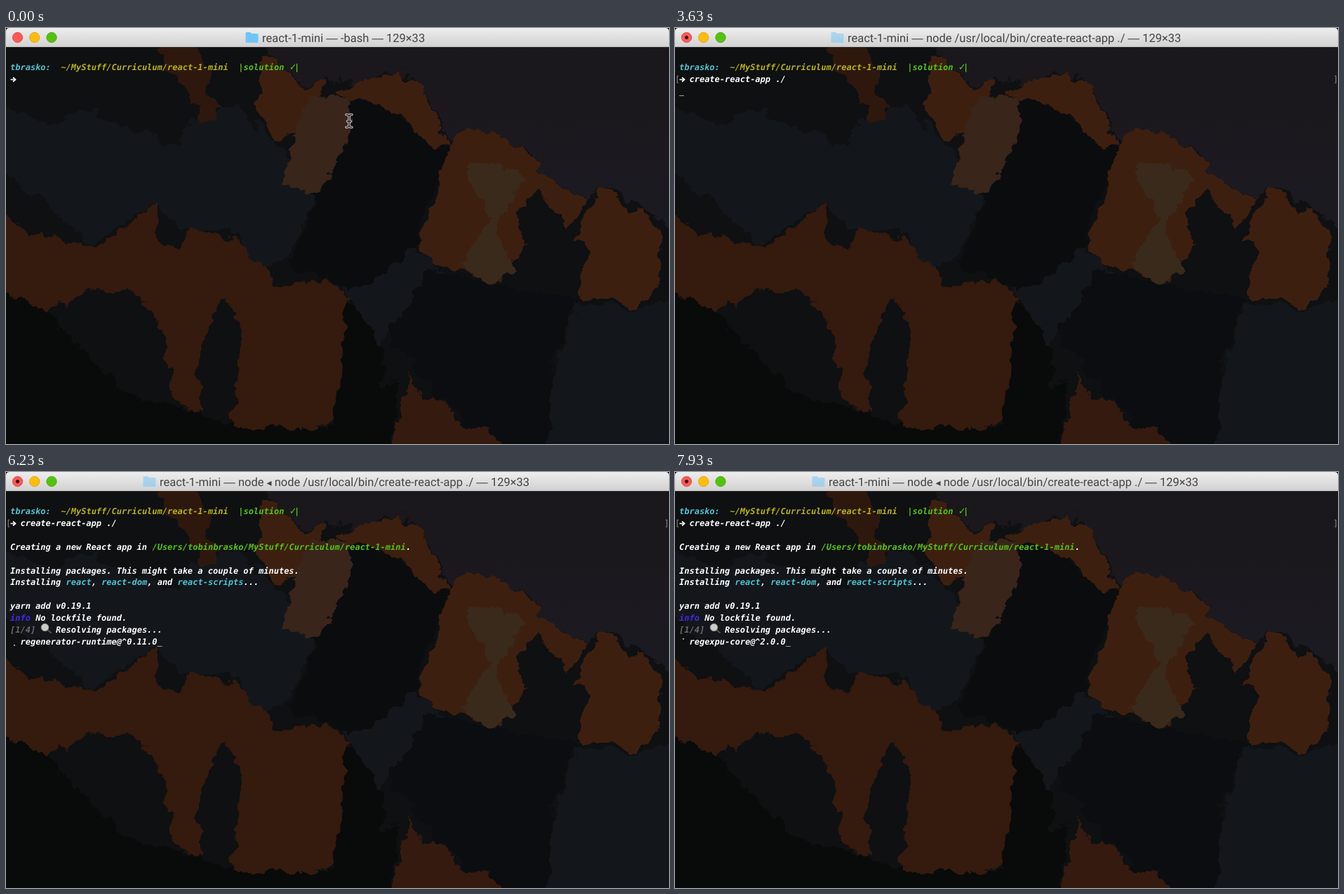
An HTML page for the animation above (8000 ms loop, 945 px wide and 593 px high).

```html
<!DOCTYPE html>
<html lang="en">
<head>
<meta charset="utf-8">
<title>Terminal</title>
<style>
  html, body { margin: 0; width: 100%; height: 100%; overflow: hidden; background: #0f1114; }
  svg { display: block; width: 945px; height: 593px; }
  text { white-space: pre; text-rendering: geometricPrecision; }
  #screen text { font: italic bold 12.01px "DejaVu Sans Mono", "Liberation Mono", monospace; fill: #fff; }
  #titles text { font: 16.5px Roboto, Inter, sans-serif; fill: #444; }
  #titles .dash { font-family: "Liberation Sans", sans-serif; }
  #titles .arrow { font-size: 14px; }
  #screen .cyan { fill: #4fc3d1; }
  #screen .yellow { fill: #b9b312; }
  #screen .green { fill: #55c410; }
  #screen .blue { fill: #4527e6; }
  #screen .gray { fill: #6b6b6b; }
  #screen .check { font: bold 13px "DejaVu Sans", sans-serif; }
  #screen .bracket { font-style: normal; font-weight: normal; fill: #8a8a8a; }
</style>
</head>
<body>
<svg viewBox="0 0 945 593">
  <defs>
    <linearGradient id="bar" x2="0" y2="1">
      <stop stop-color="#efeeef"/><stop offset="1" stop-color="#d2d1d2"/>
    </linearGradient>
    <linearGradient id="sky" x2="0" y2="1">
      <stop stop-color="#19171a"/><stop offset=".4" stop-color="#1c1a21"/>
    </linearGradient>
    <filter id="rocky" x="0" y="0" width="945" height="593" filterUnits="userSpaceOnUse" color-interpolation-filters="sRGB">
      <feTurbulence type="fractalNoise" baseFrequency=".05" numOctaves="4" seed="4"/>
      <feColorMatrix values="1 0 0 0 0  0 1 0 0 0  0 0 1 0 0  0 0 0 0 1" result="noise"/>
      <feDisplacementMap in="SourceGraphic" in2="noise" scale="24" xChannelSelector="R" yChannelSelector="G"/>
    </filter>
    <path id="folder" d="M1 7.5q0-1.5 1.5-1.5h5l2 2h8q1.5 0 1.5 1.5v10q0 1.5-1.5 1.5h-15q-1.5 0-1.5-1.5z" fill="#6fc5f7"/>
    <path id="beam" d="M485 123.5q4 0 4 3v12q0 3-4 3M493 123.5q-4 0-4 3v12q0 3 4 3M486.5 133h5"/>
  </defs>

  <rect width="945" height="593" fill="url(#sky)"/>
  <g filter="url(#rocky)">
    <path fill="#0e1012" d="M-30 0H365L378 42 420 82 455 75 500 80 535 62 575 65 600 95 635 165 680 145 750 175 762 205 832 245 850 222 920 265 980 310V630H-30z"/>
    <g fill="#13171b">
      <path d="M-30 100 60 140 110 115 240 170 265 130 330 110 400 180 440 240 395 335 360 340 320 290 250 290 215 250 120 310 60 250-30 190z"/>
      <path d="M480 370 560 300 600 330 650 370 560 430 530 450z"/>
      <path d="M815 390 900 402 980 370V630H760L785 470z"/>
    </g>
    <path fill="#0b0c0e" d="M490 105 540 110 610 170 635 172 600 250 580 310 520 370 480 370 455 355 405 340 440 240z"/>
    <path fill="#0c0d10" d="M600 345 700 367 815 388 780 470 770 620H700L650 560 580 480 545 440z"/>
    <g fill="#3d1f10">
      <path fill="#2e180d" d="M205 10H262L285 60 302 130 280 137 262 95 235 60z"/>
      <path d="M365 45 378 42 420 85 455 75 450 110 410 150 385 160 358 130z"/>
      <path d="M470 95 515 70 560 62 590 80 632 165 610 180 570 130 520 108z"/>
      <path fill="#39251a" d="M430 95 490 100 488 150 450 235 392 225 415 140z"/>
      <path d="M640 150 685 143 750 178 762 205 830 245 800 290 760 230 725 265 740 310 700 365 605 335 583 310 610 250 625 185z"/>
      <path fill="#3a2a1b" d="M650 200 700 190 740 215 700 280 725 345 690 367 645 340 690 270z"/>
      <path d="M850 222 885 258 910 262 935 300 930 370 900 400 815 380 830 310 808 300z"/>
      <path fill="#351a0e" d="M-30 245 40 295 130 312 170 285 215 250 212 300 245 312 265 287 320 300 375 345 385 370 455 357 490 385 485 470 470 565 400 578 320 570 335 420 310 380 270 470 280 550 235 530 232 440 180 372 130 372 60 405-30 365z"/>
    </g>
    <path fill="#090a0a" d="M-30 365 60 405 90 440 170 520 250 540 330 570 470 570 487 385 540 460 535 510 560 500 548 630H-30z"/>
    <path fill="#351b0f" d="M545 630 575 492 590 530 615 520 640 560 690 575 720 630z"/>
  </g>

  <rect width="945" height="27" fill="url(#bar)"/>
  <path d="M0 0H5Q0 0 0 5zM945 0H940Q945 0 945 5z" fill="#111"/>
  <path d="M0 27.5H945" stroke="#45423f" stroke-opacity=".6"/>
  <g stroke-width=".8">
    <circle cx="16.5" cy="13.5" r="7.2" fill="#fb5a55" stroke="#df4340"/>
    <circle cx="40.7" cy="13.5" r="7.2" fill="#fdbc08" stroke="#dfa012"/>
    <circle cx="65" cy="13.5" r="7.2" fill="#53c20d" stroke="#43a50c"/>
  </g>
  <circle cx="16.5" cy="13.5" r="2.5" fill="#3d0502" data-from="3630"/>
  <g id="titles"></g>

  <g id="screen">
    <path d="M6.5 73.5h5M10 70.5l3.5 3-3.5 3" fill="none" stroke="#fff" stroke-width="1.7"/>
    <g data-from="3530">
      <text class="bracket" x="0" y="77">[</text>
      <text class="bracket" x="938" y="77">]</text>
    </g>
    <text id="command"></text>
    <text id="package"></text>
    <circle id="spinner" r=".9" fill="#ddd"/>
    <rect id="cursor" width="7" height="1" fill="#a0a0a0"/>
    <g data-from="5460">
      <path d="M59 225l5 4" stroke="#55504c" stroke-width="2.2" stroke-linecap="round"/>
      <circle cx="55.5" cy="221.5" r="5.3" fill="#c9cbc9" stroke="#8c8c8a"/>
    </g>
  </g>

  <g data-until="200" fill="none" stroke-linecap="round">
    <use href="#beam" stroke="#c4c4c4" stroke-width="3.6"/>
    <use href="#beam" stroke="#222" stroke-width="1.3"/>
  </g>
</svg>

<script>
const LOOP = 8000;
const COMMAND = 'create-react-app ./';
const KEY_TIMES = [400, 760, 860, 1060, 1230, 1300, 1500, 1590, 1670, 1760,
  2000, 2160, 2260, 2400, 2515, 2630, 2960, 3230, 3260];

// [start time, folder x, folder opacity, text]
const TITLES = [
  [0, 341, 1, 'react-1-mini — -bash — 129×33'],
  [3630, 222, .5, 'react-1-mini — node /usr/local/bin/create-react-app ./ — 129×33'],
  [4260, 195, .5, 'react-1-mini — node ◂ node /usr/local/bin/create-react-app ./ — 129×33'],
];

// [start time, row, then column, text and colour class for each run]
const LINES = [
  [0, 0, [0, 'tbrasko:', 'cyan'], [10, '~/MyStuff/Curriculum/react-1-mini', 'yellow'],
    [45, '|solution', 'green'], [55, '✓', 'green check'], [56, '|', 'green']],
  [4200, 3, [0, 'Creating a new React app in '],
    [28, '/Users/tobinbrasko/MyStuff/Curriculum/react-1-mini', 'green'], [78, '.']],
  [4750, 5, [0, 'Installing packages. This might take a couple of minutes.']],
  [4800, 6, [0, 'Installing '], [11, 'react', 'cyan'], [16, ', '], [18, 'react-dom', 'cyan'],
    [27, ', and '], [33, 'react-scripts', 'cyan'], [46, '...']],
  [5200, 8, [0, 'yarn add v0.19.1']],
  [5260, 9, [0, 'info', 'blue'], [5, 'No lockfile found.']],
  [5460, 10, [0, '[1/4]', 'gray'], [9, 'Resolving packages...']],
];

// [start time, row]; row -1 hides the cursor
const CURSOR_ROWS = [[0, -1], [300, 1], [3530, 2], [4200, 5], [4700, -1],
  [4750, 6], [4800, 8], [5200, 9], [5260, 10], [5460, 11]];

const PACKAGES = `react react-dom react-scripts fbjs@^0.8.4 loose-envify@^1.1.0
  object-assign@^4.1.0 autoprefixer@6.7.2 babel-core@6.22.1 babel-jest@18.0.0
  babel-loader@6.2.10 css-loader@0.26.1 core-js@^2.4.0 regenerator-runtime@^0.11.0
  babel-runtime@^6.22.0 chalk@1.1.3 eslint@3.16.1
  babel-plugin-transform-es2015-classes@^6.22.0 babel-types@^6.22.0
  babel-traverse@^6.22.0 json5@^0.5.0 babylon@^6.11.0 debug@^2.1.1 lodash@^4.14.0
  minimatch@^3.0.2 slash@^1.0.0 source-map@^0.5.0 globals@^9.0.0 invariant@^2.2.0
  esutils@^2.0.2 babel-template@^6.22.0 babel-plugin-syntax-jsx@^6.8.0 jsesc@^1.3.0
  ms@0.7.2 repeating@^2.0.0 postcss@^5.2.11 browserslist@^1.7.1 num2fraction@^1.2.2
  home-or-tmp@^2.0.0 regjsparser@^0.2.0 regexpu-core@^2.0.0`.split(/\s+/);

const spread = (start, end, count) =>
  Array.from({ length: count }, (_, i) => Math.floor(start + (end - start) * i / (count - 1)));
const TICKS = [...spread(5460, 6230, 13), ...spread(6330, 7130, 14), ...spread(7200, 7930, 13)];

const $ = id => document.getElementById(id);
const colX = col => 6 + 7.23 * col;
const rowY = row => 60 + 16.9 * row;
const passed = (times, t) => times.filter(time => time <= t).length;

function setAttrs(el, attrs) {
  for (const name in attrs) el.setAttribute(name, attrs[name]);
}

$('titles').innerHTML = TITLES.map(([from, x, opacity, text], i) => {
  const styled = text
    .replaceAll('—', '<tspan class="dash">—</tspan>')
    .replace('◂', '<tspan class="arrow">◂</tspan>');
  const until = TITLES[i + 1]?.[0] ?? LOOP;
  return `<g data-from="${from}" data-until="${until}">
    <use href="#folder" x="${x - .5}" opacity="${opacity}"/>
    <text x="${x + 24}" y="19.5">${styled}</text></g>`;
}).join('');

$('screen').insertAdjacentHTML('beforeend', LINES.map(([from, row, ...runs]) =>
  `<g data-from="${from}">` + runs.map(([col, text, color = '']) =>
    `<text class="${color}" x="${colX(col)}" y="${rowY(row)}">${text}</text>`).join('') + '</g>'
).join(''));

setAttrs($('command'), { x: colX(2), y: rowY(1) });
setAttrs($('package'), { x: colX(2), y: rowY(11) });
const timed = [...document.querySelectorAll('[data-from], [data-until]')].map(el =>
  ({ el, from: +(el.dataset.from ?? 0), until: +(el.dataset.until ?? LOOP) }));

function show(el, visible) {
  el.style.visibility = visible ? 'visible' : 'hidden';
}

function render(t) {
  for (const { el, from, until } of timed) show(el, t >= from && t < until);

  const typed = passed(KEY_TIMES, t);
  $('command').textContent = COMMAND.slice(0, typed);

  const tick = passed(TICKS, t) - 1;
  const name = PACKAGES[tick] ?? '';
  $('package').textContent = name;

  // The dot runs down the left side of a braille cell and up the right side.
  const step = Math.max(tick, 0) % 8;
  show($('spinner'), tick >= 0);
  setAttrs($('spinner'), {
    cx: step < 4 ? 9 : 12,
    cy: 238 + 3 * (step < 4 ? step : 7 - step),
  });

  const row = CURSOR_ROWS.findLast(([from]) => from <= t)[1];
  const col = row === 1 ? 2 + typed : row === 11 ? 2 + name.length : 0;
  show($('cursor'), row >= 0);
  setAttrs($('cursor'), { x: colX(col), y: Math.round(rowY(Math.max(row, 0)) + 2.5) });
}

const start = performance.now();
function frame() {
  render((performance.now() - start) % LOOP);
  requestAnimationFrame(frame);
}
frame();
</script>
</body>
</html>
```
